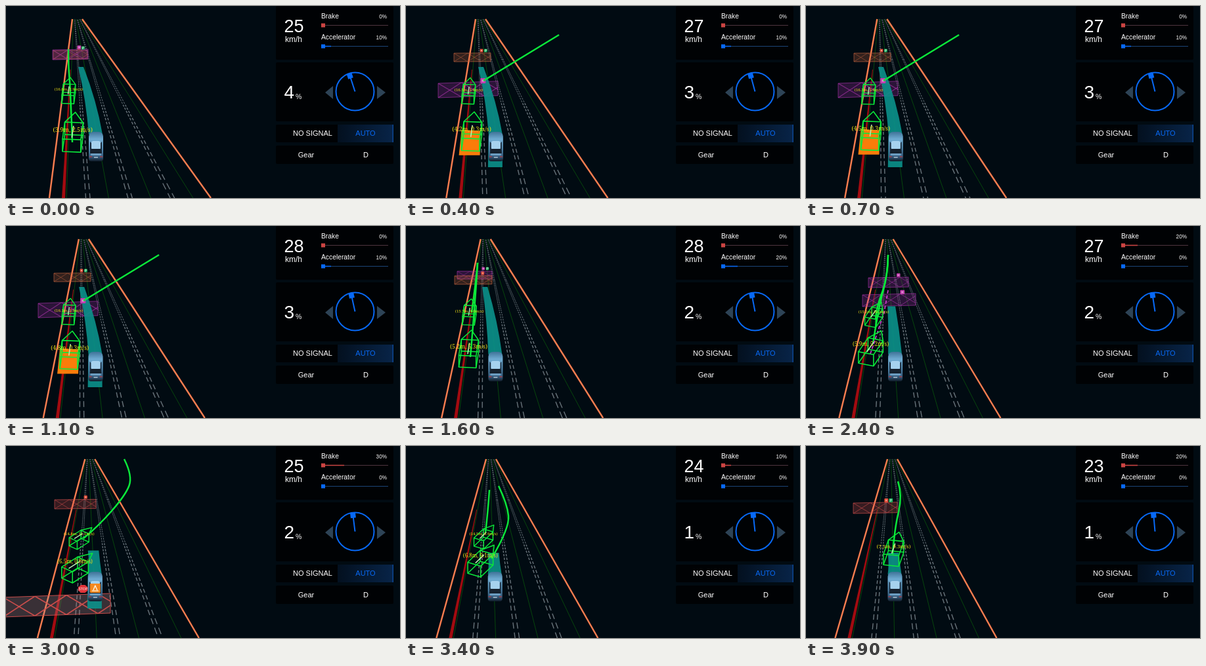
An HTML page with a canvas for the animation above (4000 ms loop, 600 px wide and 293 px high).

```html
<!DOCTYPE html>
<html lang="en">
<head>
<meta charset="utf-8">
<title>Driving view</title>
<style>
html, body { margin: 0; width: 100%; height: 100%; overflow: hidden; background: #010b12; }
canvas { display: block; width: 600px; height: 293px; }
</style>
</head>
<body>
<canvas id="view" width="600" height="293"></canvas>
<script>
const g = document.getElementById('view').getContext('2d');
const LOOP = 4000, STEP = 100, LAST = LOOP - STEP;
const SANS = '"Liberation Sans", Arial, sans-serif';
const SERIF = '"Noto Serif", "Liberation Serif", serif';
const BLUE = '#0869f5', GREEN = '#0be83a', CORAL = '#fb7e50', SIGN = '#1cac5c';
const RED = '#d8504e', PURPLE = '#a632a6', ORANGE = '#c8653f';

// Detections that switch on and off; zone: colour, left, top, width, height
const scenes = [
  { from: 0, brake: 0, accel: 10, near: 2.5, far: 2.9, go: true,
    zones: [[ORANGE, 72, 68, 52, 13], [PURPLE, 71, 67, 54, 15]],
    paths: [[95, 66, 95, 94, 98, 125, 101, 208]] },
  { from: 400, brake: 0, accel: 10, near: 0.3, far: 2.9, go: true, block: true, tail: 246,
    zones: [[ORANGE, 73, 72, 56, 13], [PURPLE, 49, 118, 91, 22]],
    paths: [[233, 44, 118, 114]] },
  { from: 1200, brake: 0, accel: 20, near: 5.3, far: 6, go: true,
    zones: [[PURPLE, 78, 69, 53, 12], [ORANGE, 74, 76, 57, 13]],
    paths: [[109, 56, 106, 90, 100, 132], [109, 56, 107, 95, 98, 200]] },
  { from: 2000, brake: 20, accel: 0, near: 5.2, far: 10.2, dots: true,
    zones: [[PURPLE, 95, 79, 61, 15], [PURPLE, 86, 105, 81, 18]],
    paths: [[125, 44, 124, 80, 107, 125, 106, 142], [125, 44, 125, 72, 110, 126, 102, 180]] },
  { from: 2900, brake: 30, accel: 0, near: 0.8, far: 11.1, tail: 248, stop: true,
    zones: [[RED, 74, 82, 63, 14], [RED, -4, 231, 163, 30]],
    paths: [[180, 20, 193, 46, 182, 75, 140, 123, 118, 141]] },
  { from: 3200, brake: 10, accel: 0, near: 9.1, far: 8.9,
    zones: [],
    paths: [[127, 67, 125, 98, 121, 132], [141, 61, 154, 88, 158, 125, 130, 172]] },
  { from: 3700, brake: 20, accel: 0, near: 9.3, go: true,
    zones: [[RED, 72, 87, 67, 16]],
    paths: [[140, 54, 147, 76, 135, 125, 132, 165]] }
];

const smooth = (a, b, u) => {
  const k = Math.min(1, Math.max(0, (u - a) / (b - a)));
  return k * k * (3 - 2 * k);
};

// Everything that glides, from u = 0..1 through the loop
function pose(u) {
  const ease = u ** 0.67;
  return {
    drift: 23 * ease,
    wheel: 18 - 13 * ease,
    speed: 24.85 + 20.5 * u - 38.96 * u ** 2 + 16.45 * u ** 3,
    carX: 137 - 1.5 * u,
    turn: 0.1 + 0.75 * Math.exp(-(((u - 0.77) / 0.18) ** 2)),
    near: { x: 86 - 14 * u + 46 * u ** 6, y: 203 - 12 * u - 26 * u ** 4,
      size: 1 - 0.14 * u, dist: 3.85 + 3.4 * u },
    far: { x: 85 + 32 * u ** 4, y: 136 + 5 * u,
      size: 0.66, dist: 16.8 - 2.6 * u },
    lane: { x: 114 + 19 * smooth(0.2, 0.75, u), y: 93 + 70 * smooth(0.45, 0.82, u),
      w: 8 + 9 * smooth(0.45, 0.82, u) }
  };
}

function trace(pts, close) {
  g.beginPath();
  for (let i = 0; i < pts.length; i += 2) g.lineTo(pts[i], pts[i + 1]);
  if (close) g.closePath();
}

function stroke(color, width) {
  g.strokeStyle = color;
  g.lineWidth = width;
  g.stroke();
}

function line(pts, color, width = 1, close = false) {
  trace(pts, close);
  stroke(color, width);
}

function fill(pts, color) {
  trace(pts, true);
  g.fillStyle = color;
  g.fill();
}

function rect(x, y, w, h, color, r = 0) {
  g.beginPath();
  g.roundRect(x, y, w, h, r);
  g.fillStyle = color;
  g.fill();
}

function text(str, x, y, size, color = '#fff', align = 'left', font = SANS) {
  g.font = `${size}px ${font}`;
  g.textAlign = align;
  g.fillStyle = color;
  g.fillText(str, x, y);
}

// Smooth line bending at each inner point
function curve(p, color, width) {
  const n = p.length;
  g.beginPath();
  g.moveTo(p[0], p[1]);
  for (let i = 2; i < n - 4; i += 2)
    g.quadraticCurveTo(p[i], p[i + 1], (p[i] + p[i + 2]) / 2, (p[i + 1] + p[i + 3]) / 2);
  g.quadraticCurveTo(p[n - 4], p[n - 3], p[n - 2], p[n - 1]);
  stroke(color, width);
}

function roadX(d, y, drift) {
  const top = 101 + drift + d * 0.061, bottom = 66 - drift * 0.94 + d;
  return top + (bottom - top) * (y - 20) / 273;
}

function dashes(d, drift, u) {
  const count = 46, phase = u * 24 % 1;
  const yAt = n => 2 + 1 / (0.0034 + n * 0.0002);
  const part = (y1, y2, color, width) =>
    line([roadX(d, y1, drift), y1, roadX(d, y2, drift), y2], color, width);
  for (let n = -1 - phase; n < count; n++) {
    const y = yAt(n);
    part(y, yAt(n + 0.62), '#69737a', y > 150 ? 1.4 : 1);
  }
  g.setLineDash([2, 1.2]);
  part(yAt(count - phase), 20, '#606970', 0.9);
  g.setLineDash([]);
}

function road(drift, u) {
  const solid = (d, color, width) =>
    line([roadX(d, 20, drift), 20, roadX(d, 293, drift), 293], color, width);
  for (let i = 0; i < 4; i++) solid(26 + i * 64.3, '#07450d', 1);
  fill([roadX(20, 97, drift), 97, roadX(23, 97, drift), 97,
    roadX(24, 293, drift), 293, roadX(19, 293, drift), 293], '#a20b10');
  for (let i = 0; i < 3; i++) {
    dashes(55.5 + i * 64.3, drift, u);
    dashes(62 + i * 64.3, drift, u);
  }
  solid(0, CORAL, 2.4);
  solid(246, CORAL, 2.4);
}

function zone([color, x, y, w, h]) {
  const rise = (h - 12) / 3, cells = w / (h * 1.6);
  const top = k => y - rise * k / cells, px = k => x + w * k / cells;
  const big = h > 25;
  g.save();
  trace([x, y, x + w, y - rise, x + w, y - rise + h, x, y + h], true);
  g.globalAlpha = big ? 0.3 : 0.25;
  g.fillStyle = big ? '#b98488' : color;
  g.fill();
  g.globalAlpha = big ? 0.9 : 0.65;
  stroke(color, 1);
  g.clip();
  for (let k = 0; k < cells; k++) {
    line([px(k), top(k), px(k + 1), top(k + 1) + h], color, h / 18);
    line([px(k), top(k) + h, px(k + 1), top(k + 1)], color, h / 18);
  }
  g.restore();
}

// Each zone carries a small sign near its right end
function signs(scene) {
  scene.zones.forEach(([color, x, y, w, h], i) => {
    const sx = x + w * 0.75, sy = y - 4;
    if (h > 25) return stopSign(sx - 1, sy - 9);
    const s = h * 0.37;
    rect(sx - s / 2, sy - s / 2, s, s, color === PURPLE ? '#c23cae' : '#e04a34', 1);
    rect(sx - s / 5, sy - s / 5, s * 0.4, s * 0.4, 'rgba(255,255,255,.45)');
    if (scene.go && i === 0) {
      rect(sx + 4, sy - s / 2, s, s, SIGN, 1);
      text('P', sx + 4 + s / 2, sy + 1.7, 5, '#fff', 'center');
    }
  });
}

function stopSign(x, y) {
  const pts = [];
  for (let i = 0; i < 8; i++) {
    const a = (i + 0.5) * Math.PI / 4;
    pts.push(x + 8 * Math.cos(a), y + 6.5 * Math.sin(a));
  }
  fill(pts, '#e2343a');
  text('STOP', x, y + 2, 5, '#fff', 'center');
}

function warning(x, y) {
  rect(x - 8, y - 7, 16, 14, '#f5891f', 1);
  line([x - 3, y + 3, x, y - 4, x + 3, y + 3], '#fff3df', 1.4);
  line([x - 5, y + 4, x + 5, y + 4], '#fff3df', 1.2);
}

function drivePath({ lane: { x, y, w }, carX }, tail) {
  const mid = (y + 196) / 2, bend = carX - (carX - x) * 0.3;
  g.beginPath();
  g.moveTo(x - w / 2, y);
  g.lineTo(x + w / 2, y);
  g.quadraticCurveTo(bend + 8, mid, carX + 10, 196);
  if (tail) {
    g.lineTo(carX + 10, tail);
    g.lineTo(carX - 12, tail);
  }
  g.lineTo(carX - 11, 196);
  g.quadraticCurveTo(bend - 8, mid, x - w / 2, y);
  g.fillStyle = 'rgba(12,146,139,.9)';
  g.fill();
}

// Wire box turned by the heading, with a roof tip, an arrow and a label
function vehicle({ x, y, size, dist }, turn, speed) {
  const c = Math.cos(turn), s = Math.sin(turn);
  const rx = 28 * size * c, ry = 11 * size * s, h = 19 * size;
  const bx = 36 * size * s, by = -26 * size * c;
  const face = (a, b) => [a, b, a + rx, b + ry, a + rx, b + ry + h, a, b + h];
  const front = face(x, y), back = face(x + bx, y + by);
  const width = 1.6 * size ** 0.3;
  line(front, GREEN, width, true);
  line(back, GREEN, width, true);
  for (let i = 0; i < 8; i += 2)
    line([front[i], front[i + 1], back[i], back[i + 1]], GREEN, width);
  const mx = x + (rx + bx) / 2, my = y + (ry + by) / 2;
  line([back[0], back[1], mx + bx * 1.1, my + by * 1.1, back[2], back[3]], GREEN, width);
  line([mx - bx * 0.4, my - by * 0.4, mx + bx * 0.3, my + by * 0.3], '#b9f0b4', width);
  text(`(${dist.toFixed(1)}m, ${speed.toFixed(1)}m/s)`, mx, y + by / 2 + 2,
    9.2 * size, '#eee015', 'center', SERIF);
}

function objects(p, scene) {
  const { x, y } = p.near;
  if (scene.block) fill([x, y - 13, x + 29, y - 11, x + 28, y + 26, x - 4, y + 26], '#fb7c0a');
  scene.paths.forEach(pts => curve(pts, GREEN, 2.5));
  if (scene.dots) {
    g.setLineDash([5, 3]);
    line([125, 98, 119, 132, 97, 198], '#c83ac8', 1.8);
    g.setLineDash([]);
  }
  if (scene.far) vehicle(p.far, p.turn, scene.far);
  vehicle(p.near, p.turn, scene.near);
}

function car(x) {
  g.save();
  g.translate(x, 214);
  const body = g.createLinearGradient(0, -22, 0, 23);
  body.addColorStop(0, '#3f7398');
  body.addColorStop(0.25, '#70acd2');
  body.addColorStop(0.6, '#5288ae');
  body.addColorStop(0.85, '#365b7c');
  body.addColorStop(1, '#101c29');
  rect(-11, -22, 22, 45, body, [7, 7, 4, 4]);
  for (const side of [-1, 1]) {
    fill([9 * side, -7, 7 * side, -5, 7 * side, 7, 9 * side, 11], '#182b3d');
    rect(side * 8 - 2, 15, 4, 2, '#8a4350');
  }
  rect(-7, -8, 14, 13, '#a6d2ee', 3);
  fill([-7, 4, 7, 4, 9, 11, -9, 11], '#16222f');
  rect(-8, 11, 16, 3, '#6d9fc3', 1);
  rect(-3, 16, 6, 2, '#93a9ba');
  g.restore();
}

function slider(name, y, pct, color, rail) {
  text(name, 480, y - 11, 10.3);
  text(`${pct}%`, 580, y - 11, 8.2, '#fff', 'right');
  line([480, y, 582, y], rail, 1.2);
  line([480, y, 485 + pct, y], color, 1.6);
  rect(480, y - 3, 6, 6, color);
}

function dashboard(p, scene) {
  for (const [y, h] of [[0, 82], [86, 90], [181, 27], [213, 28]]) rect(411, y, 179, h, '#000204', 2);
  text(Math.round(p.speed), 438.5, 40, 27, '#fff', 'center');
  text('km/h', 438, 55, 12, '#fff', 'center');
  slider('Brake', 29.5, scene.brake, '#cc4543', '#4e3640');
  slider('Accelerator', 61.5, scene.accel, BLUE, '#1c4576');

  text(Math.round(p.wheel / 4.4), 423.5, 141, 28);
  text('%', 441, 141.5, 10.5);
  fill([486, 132, 498, 122, 498, 142], '#2d4356');
  fill([578, 132, 565, 122, 565, 142], '#2d4356');
  g.save();
  g.translate(531.5, 130.5);
  g.beginPath();
  g.arc(0, 0, 29, 0, Math.PI * 2);
  stroke(BLUE, 2);
  g.rotate(-p.wheel * Math.PI / 180);
  line([0, -24, 0, 0], BLUE, 2);
  rect(-4, -29, 8, 8, BLUE);
  g.restore();

  const auto = g.createLinearGradient(505, 0, 590, 0);
  auto.addColorStop(0, '#03101f');
  auto.addColorStop(1, '#082448');
  rect(505, 181, 85, 27, auto);
  rect(588.5, 181, 1.5, 27, '#0d4694');
  text('NO SIGNAL', 467, 198, 11, '#fff', 'center');
  text('AUTO', 547.5, 198, 11, BLUE, 'center');
  text('Gear', 457, 230.5, 11, '#fff', 'center');
  text('D', 548, 230.5, 11, '#fff', 'center');
}

function draw(t) {
  const u = t / LAST, p = pose(u);
  const scene = scenes.filter(s => s.from <= t).pop();
  g.fillStyle = '#010b12';
  g.fillRect(0, 0, 600, 293);
  road(p.drift, u);
  scene.zones.forEach(zone);
  drivePath(p, scene.tail);
  signs(scene);
  objects(p, scene);
  car(p.carX);
  if (scene.stop) warning(p.carX, 217);
  dashboard(p, scene);
}

function tick() {
  const t = performance.now() % LOOP;
  draw(Math.floor(t / STEP) * STEP);
  requestAnimationFrame(tick);
}
g.lineJoin = 'round';
tick();
</script>
</body>
</html>
```
